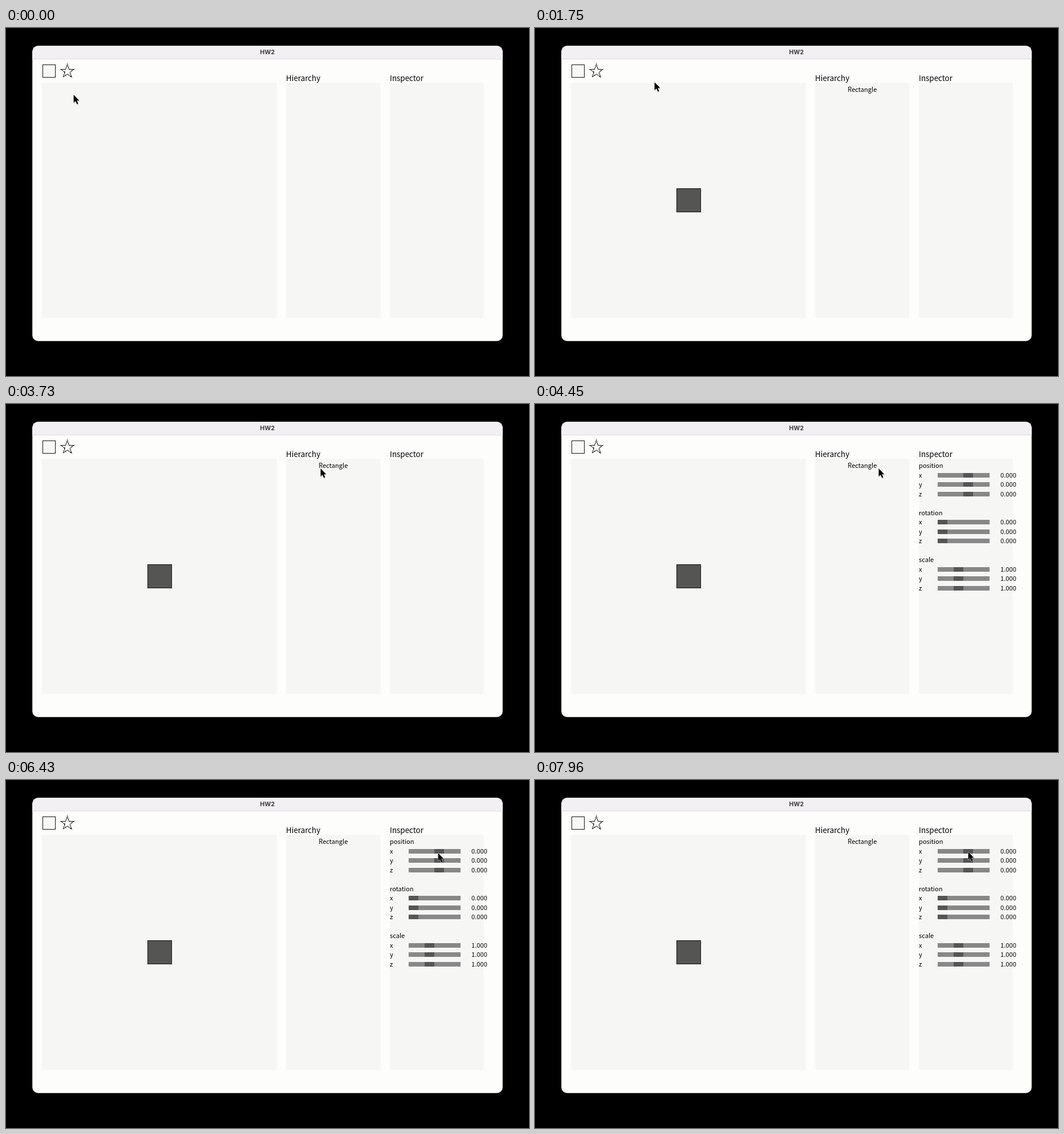
Recreate the animation shown at these times as an HTML page. Size 917 by 610 pixels, loop 7990 ms.

```html
<!DOCTYPE html>
<html lang="en">
<head>
<meta charset="utf-8">
<title>HW2</title>
<style>
  html, body { margin: 0; width: 100%; height: 100%; overflow: hidden; background: #000; }
  svg { display: block; width: 917px; height: 610px; }
  text { font: 11.1px "Noto Sans CJK JP", "Noto Sans CJK SC", "Noto Sans CJK", "Noto Sans", sans-serif; }
  .head { font-size: 13.4px; }
  .title { font: 700 10.6px Inter, sans-serif; fill: #3c3c3c; text-anchor: middle; }
  .panel { fill: #f6f6f5; }
  .track { fill: #888; }
  .thumb { fill: #555; }
  .track, .thumb, .crisp { shape-rendering: crispEdges; }
</style>
</head>
<body>
<svg viewBox="0 0 917 610">
  <clipPath id="frame"><rect x="46.2" y="31.2" width="824.6" height="517.6" rx="10"/></clipPath>
  <g clip-path="url(#frame)">
    <rect width="917" height="610" fill="#fdfdfc"/>
    <rect width="917" height="54" fill="#f2f0f3"/>
    <rect y="54" width="917" height="1" fill="#dfdcef"/>
  </g>
  <text class="title" x="458.4" y="46.2">HW2</text>
  <g id="panels"></g>

  <rect id="button" x="64.5" y="64.5" width="22" height="22" stroke="#111"/>
  <path id="star" class="crisp" fill="none" stroke="#111"/>

  <g id="shape">
    <rect class="crisp" x="248.5" y="281.5" width="41.5" height="41" fill="#555" stroke="#111"/>
    <text x="573.8" y="112" text-anchor="middle">Rectangle</text>
  </g>
  <g id="inspector"></g>

  <g id="cursor">
    <path d="M.6 1V14.9L3.9 12L6.3 17.6L8.6 16.6L6.3 11.2H10.5Z" transform="translate(.6 1.6)" opacity=".18"/>
    <path d="M.6 1V14.9L3.9 12L6.3 17.6L8.6 16.6L6.3 11.2H10.5Z" stroke="#fff" paint-order="stroke"/>
  </g>
</svg>
<script>
const LOOP = 7990, ROW = 16.5, RIGHT = 673;
const el = id => document.getElementById(id);

// Cursor trips: start and end time, then where the tip stops
const home = [118, 116];
const trips = [
  [30, 720, 72, 77],
  [1200, 2390, 379, 116],
  [2630, 3030, 522, 127],
  [3230, 3700, 551, 112],
  [4180, 4440, 602, 112],
  [4550, 5750, 750, 130],
  [6010, 6400, 757, 127],
  [6480, 6830, 767, 126],
  [7110, 7900, 759, 125]
];

function tip(t) {
  let [x, y] = home;
  for (const [start, end, toX, toY] of trips) {
    const u = Math.min(1, Math.max(0, (t - start) / (end - start)));
    const ease = u * u * (3 - 2 * u);
    x += (toX - x) * ease;
    y += (toY - y) * ease;
  }
  return [Math.round(x), Math.round(y)];
}

function starPath(cx, cy, outer, inner) {
  const points = Array.from({ length: 10 }, (_, i) => {
    const r = i % 2 ? inner : outer, a = i * Math.PI / 5 - Math.PI / 2;
    return [cx + r * Math.cos(a), cy + r * Math.sin(a)];
  });
  return "M" + points.join("L") + "Z";
}

function panel(x, width, title = "") {
  return `<rect class="panel" x="${x}" y="96" width="${width}" height="412"/>
    <text class="head" x="${x}" y="93.3">${title}</text>`;
}

// A heading and three sliders; level is the thumb's place from 0 to 1
function section(name, index, level, value) {
  const top = 112 + index * 5 * ROW, width = 91;
  const rows = ["x", "y", "z"].map((axis, i) => {
    const y = top + ROW * (i + 1);
    const thumbX = RIGHT + 2 * ROW + level * (width - ROW);
    const bar = (type, x, w) =>
      `<rect class="${type}" x="${x}" y="${y - 8}" width="${w}" height="${ROW / 2}"/>`;
    return `<text x="${RIGHT}" y="${y}">${axis}</text>` +
      bar("track", RIGHT + 2 * ROW, width) + bar("thumb", thumbX, ROW) +
      `<text x="843.8" y="${y}" text-anchor="end">${value}</text>`;
  });
  return `<text x="${RIGHT}" y="${top}">${name}</text>` + rows.join("");
}

el("panels").innerHTML =
  panel(63, 411.5) + panel(491, 165.5, "Hierarchy") + panel(RIGHT, 164.5, "Inspector");
el("star").setAttribute("d", starPath(107.6, 76, 12.3, 4.8));
el("inspector").innerHTML =
  section("position", 0, .61, "0.000") +
  section("rotation", 1, 0, "0.000") +
  section("scale", 2, .38, "1.000");

const show = (id, on) => el(id).setAttribute("visibility", on ? "visible" : "hidden");

function draw(now) {
  const t = now % LOOP, [x, y] = tip(t);
  const hover = Math.max(Math.abs(x - 75.5), Math.abs(y - 75.5)) < 12;
  el("button").setAttribute("fill", hover ? "#8a8a8a" : "#f8f8f7");
  el("button").setAttribute("stroke-width", hover ? 2 : 1);
  show("shape", t >= 850);
  show("inspector", t >= 4130);
  el("cursor").setAttribute("transform", `translate(${x} ${y})`);
  requestAnimationFrame(draw);
}
requestAnimationFrame(draw);
</script>
</body>
</html>
```
